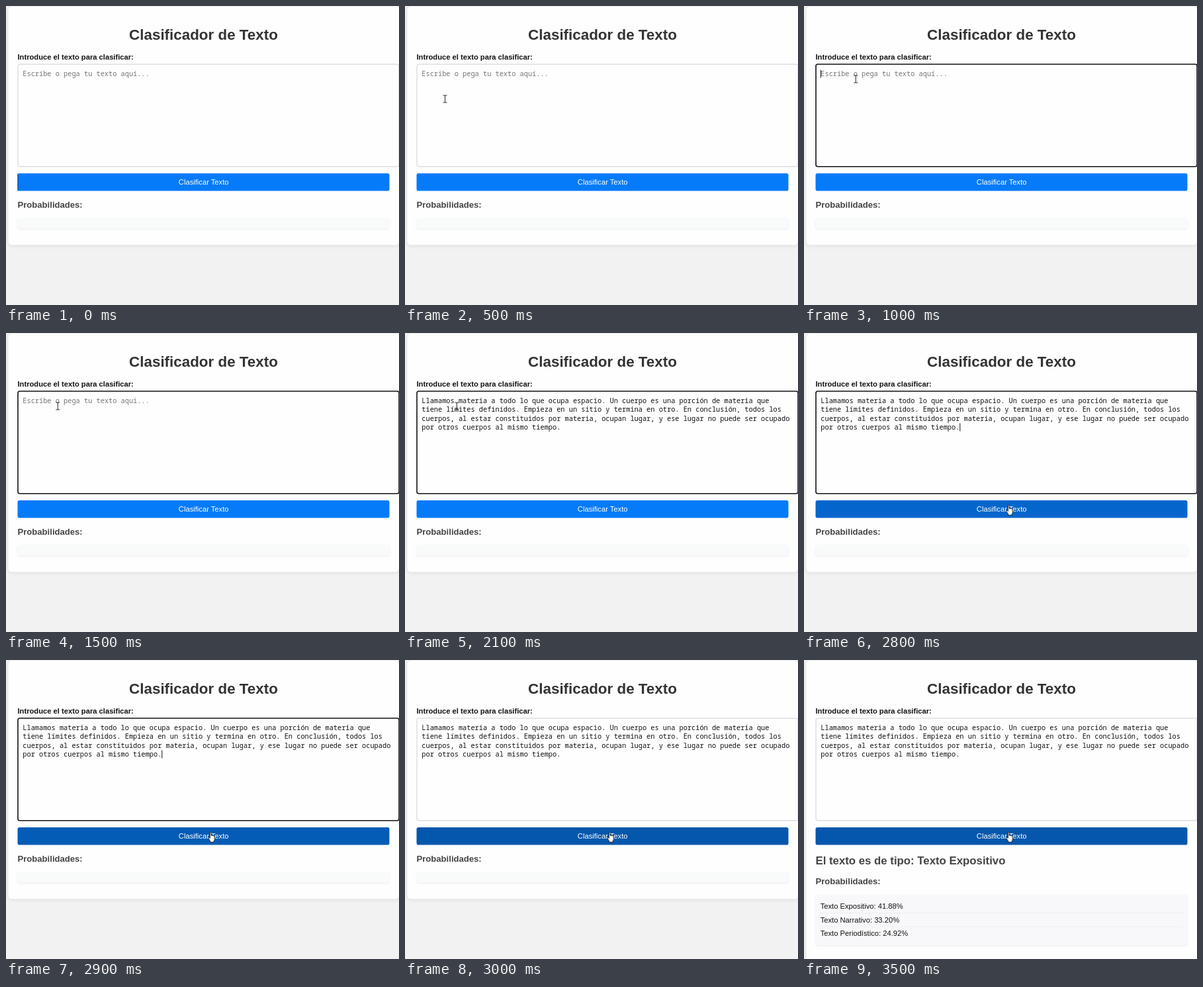
Write an HTML page that moves like this. It is 594 by 452 pixels and loops after 4500 ms.

```html
<!DOCTYPE html>
<html lang="es">
<head>
<meta charset="utf-8">
<title>Clasificador de Texto</title>
<style>
  html, body { margin: 0; width: 100%; height: 100%; overflow: hidden; background: #f2f2f2; }
  svg { display: block; width: 594px; height: 452px; }
  text { font: 11.2px "Liberation Sans", Arial, sans-serif; fill: #111; }
  .bold { font-weight: bold; }
  .title { font-size: 22.4px; fill: #333; }
  .kind { font-size: 16.8px; fill: #444; }
  .sub { font-size: 13.1px; fill: #444; }
  .mono text { font: 10.31px "Noto Sans Mono", "DejaVu Sans Mono", monospace; }
  #hint text { fill: #757575; }
  #card { filter: drop-shadow(0 1.4px 3px rgba(0, 0, 0, .09)); }
  #list { filter: drop-shadow(0 1px 1.4px rgba(0, 0, 0, .08)); }
</style>
</head>
<body>
<svg viewBox="0 0 594 452">
  <rect width="594" height="452" fill="#f2f2f2"/>
  <rect id="card" x="3.5" y="1" width="590.5" rx="5.6" fill="#fefefe"/>
  <text class="bold title" x="298.5" y="50.5" text-anchor="middle">Clasificador de Texto</text>
  <text class="bold" x="17.5" y="81">Introduce el texto para clasificar:</text>

  <rect id="area" x="18" y="88" width="576" height="154.8" rx="2.8" fill="#fefefe"/>
  <g id="hint" class="mono"><text x="25.3" y="106">Escribe o pega tu texto aquí...</text></g>
  <g id="pasted" class="mono"></g>
  <path id="caret" stroke="#111" stroke-width="1"/>

  <rect id="button" x="17.5" y="253" width="562" height="26.5" rx="2.8"/>
  <path id="edge" d="M18 253.5V279.5" stroke="#123a68" stroke-width="1"/>
  <text x="298.7" y="270" text-anchor="middle" style="fill:#fff">Clasificar Texto</text>

  <rect id="list" x="17.5" width="562" rx="3"/>
  <text id="sub" class="bold sub" x="17.5">Probabilidades:</text>
  <g id="result">
    <text class="bold kind" x="17.5" y="309">El texto es de tipo: Texto Expositivo</text>
    <text x="24.7" y="376.3">Texto Expositivo: 41.88%</text>
    <text x="24.7" y="396.7">Texto Narrativo: 33.20%</text>
    <text x="24.7" y="417">Texto Periodístico: 24.92%</text>
    <path d="M24.5 382.5H572.5M24.5 403H572.5" stroke="#ebeaec" stroke-width=".8"/>
  </g>

  <path id="beam" d="M-3-5.5H-1L0-4.8L1-5.5H3M0-4.8V4.8M-3 5.5H-1L0 4.8L1 5.5H3"
        fill="none" stroke="#333" stroke-width="1.1"/>
  <path id="hand" d="M-2.2-6.5Q-1.2-7.8-.3-6.5V-2Q.8-2.8 1.6-1.7Q2.7-2.4 3.4-1.2Q4.8-1.6 5 0V3.2Q4.8 5.3 3.7 6.2V8H-1.8V6.4L-4.8 2.2Q-5.3.6-3.8.8L-2.2 2.2Z"
        fill="#fff" stroke="#222" stroke-width="1" stroke-linejoin="round"/>
</svg>
<script>
const LOOP = 4500, STEP = 100;
const FOCUS = 1000, PASTE = 1700, PRESS = 3000, DONE = 3100;
const LINES = [
  "Llamamos materia a todo lo que ocupa espacio. Un cuerpo es una porción de materia que",
  "tiene límites definidos. Empieza en un sitio y termina en otro. En conclusión, todos los",
  "cuerpos, al estar constituidos por materia, ocupan lugar, y ese lugar no puede ser ocupado",
  "por otros cuerpos al mismo tiempo."
];
// Pointer path: time, x, y
const PATH = [[200, 60.5, 140.5], [700, 60.5, 140.5], [1000, 78.3, 110.5],
              [2100, 78.3, 110.5], [2400, 284, 262], [2600, 310.5, 267.3]];

const $ = id => document.getElementById(id);
const set = (id, attrs) => {
  for (const key in attrs) $(id).setAttribute(key, attrs[key]);
};
const show = (id, on) => set(id, { visibility: on ? "visible" : "hidden" });
const clamp = v => Math.max(0, Math.min(1, v));
const smooth = v => v * v * (3 - 2 * v);
const within = (t, from, to) => t >= from && t < to;
const mix = (a, b, k) => `rgb(${a.map((v, i) => Math.round(v + (b[i] - v) * k))})`;

LINES.forEach((line, i) => {
  const text = document.createElementNS("http://www.w3.org/2000/svg", "text");
  text.setAttribute("x", 25.3);
  text.setAttribute("y", 106 + i * 13.35);
  text.textContent = line;
  $("pasted").append(text);
});

function pointerAt(t) {
  let [, x, y] = PATH[0];
  for (let i = 1; i < PATH.length; i++) {
    const [t0, x0, y0] = PATH[i - 1], [t1, x1, y1] = PATH[i];
    if (t < t0) break;
    const k = smooth(clamp((t - t0) / (t1 - t0)));
    x = x0 + (x1 - x0) * k;
    y = y0 + (y1 - y0) * k;
  }
  return [x, y];
}

function draw(time) {
  const t = Math.floor(time % LOOP / STEP) * STEP;
  const focused = within(t, FOCUS, PRESS), pasted = t >= PASTE, done = t >= DONE;

  set("card", { height: done ? 470 : 360.3 });
  set("area", { stroke: focused ? "#111" : "#cfcfd3", "stroke-width": focused ? 1.6 : 1 });
  show("hint", !pasted);
  show("pasted", pasted);
  set("caret", { d: pasted ? "M235.8 136.5V148.5" : "M25.3 96.5V108.5" });
  show("caret", within(t, FOCUS, 1500) || within(t, PASTE, 2100) || within(t, 2400, PRESS));

  const hover = smooth(clamp((t - 2550) / 450));
  set("button", { fill: mix([5, 123, 249], [4, 87, 172], hover) });
  show("edge", t < STEP);

  set("sub", { y: done ? 339 : 305 });
  set("list", { y: done ? 355 : 321, height: done ? 76 : 15.5, fill: done ? "#f8f7f9" : "#f9fbfb" });
  show("result", done);

  const [x, y] = pointerAt(t), overButton = y > 253;
  const transform = `translate(${x} ${y})`;
  set("beam", { transform });
  set("hand", { transform });
  show("beam", t >= PATH[0][0] && !overButton);
  show("hand", overButton);
}

const start = performance.now();
function tick() {
  draw(performance.now() - start);
  requestAnimationFrame(tick);
}
tick();
</script>
</body>
</html>
```
